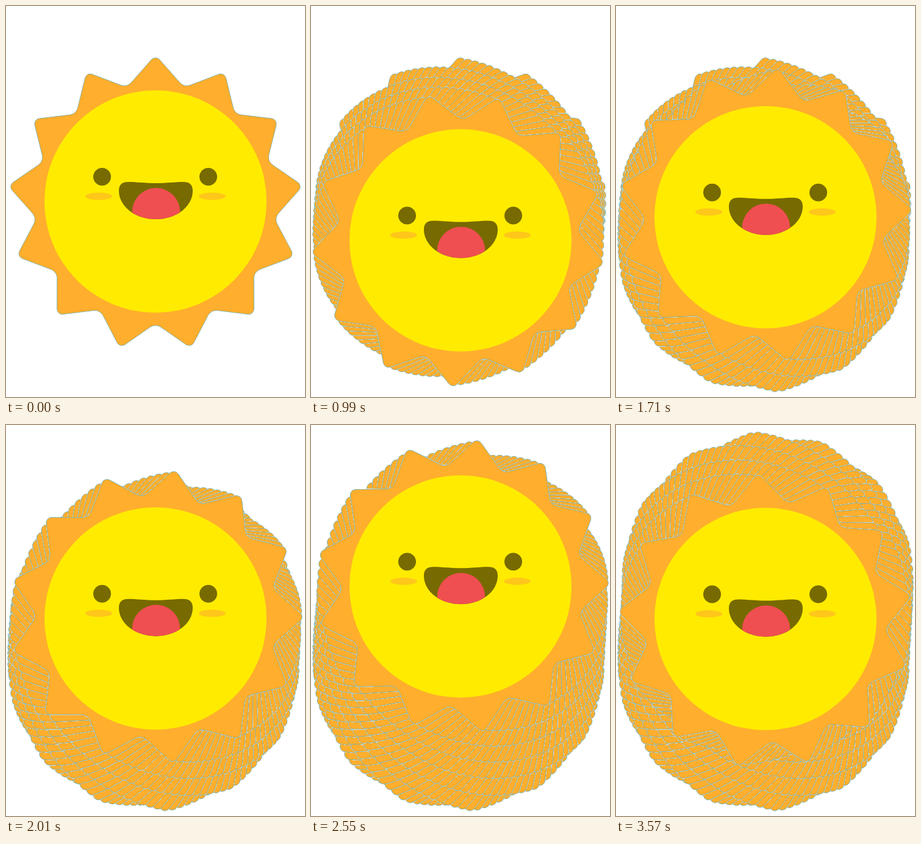
These frames come from a looping animation (490x640 px, 3.6 s). An HTML page with a canvas:

```html
<!DOCTYPE html>
<html lang="en">
<head>
<meta charset="utf-8">
<title>Rolling sun</title>
<style>
  html, body { margin: 0; width: 100%; height: 100%; overflow: hidden; background: #fff; }
  canvas { display: block; }
</style>
</head>
<body>
<canvas id="stage" width="490" height="640"></canvas>
<script>
const W = 490, H = 640, CX = 245, RAYS = 13;
const STEP = 30, STEPS = 120, LOOP = STEP * STEPS;
const ALPHA_CUT = 50;

const ctx = document.getElementById('stage').getContext('2d');
const layer = Object.assign(document.createElement('canvas'), { width: W, height: H });
const layerCtx = layer.getContext('2d', { willReadFrequently: true });

// Height of the sun's centre: straight moves between [ms, y] stops.
const STOPS = [[0, 320], [1188, 396.2], [2715, 248.4], [LOOP, 320]];

function heightAt(ms) {
  const i = STOPS.findIndex(([t], k) => k > 0 && ms <= t);
  const [t0, y0] = STOPS[i - 1], [t1, y1] = STOPS[i];
  return y0 + (y1 - y0) * (ms - t0) / (t1 - t0);
}

// Rounded star; its hub sits slightly below the pivot.
function makeStar() {
  const star = new Path2D(), count = RAYS * 2;
  const corner = k => {
    const r = k % 2 ? 196 : 243.5, a = k * Math.PI / RAYS;
    return [r * Math.sin(a), 3.6 - r * Math.cos(a)];
  };
  const [ax, ay] = corner(0), [bx, by] = corner(1);
  star.moveTo((ax + bx) / 2, (ay + by) / 2);
  for (let k = 1; k <= count; k++) {
    star.arcTo(...corner(k), ...corner(k + 1), k % 2 ? 15 : 9);
  }
  star.closePath();
  return star;
}

function makeMouth() {
  const mouth = new Path2D();
  mouth.ellipse(0.5, -17.5, 60.5, 46.5, 0, 0, Math.PI);
  mouth.bezierCurveTo(-60, -28, -54, -32, -45, -32);
  mouth.bezierCurveTo(-30, -32, -18, -30, 0.5, -30);
  mouth.bezierCurveTo(19, -30, 31, -32, 46, -32);
  mouth.bezierCurveTo(55, -32, 61, -28, 61, -17.5);
  mouth.closePath();
  return mouth;
}

const star = makeStar(), mouth = makeMouth();

function oval(x, y, rx, ry, color) {
  ctx.fillStyle = color;
  ctx.beginPath();
  ctx.ellipse(x, y, rx, ry, 0, 0, Math.PI * 2);
  ctx.fill();
}

// Edge pixels become either clear or solid on white, so poses leave dashed seams.
function hardenEdges() {
  const image = layerCtx.getImageData(0, 0, W, H), px = image.data;
  for (let i = 0; i < px.length; i += 4) {
    const a = px[i + 3];
    if (a === 0 || a === 255) continue;
    for (let c = i; c < i + 3; c++) px[c] = 255 + (px[c] - 255) * a / 255;
    px[i + 3] = a < ALPHA_CUT ? 0 : 255;
  }
  layerCtx.putImageData(image, 0, 0);
}

function drawRays(y, angle) {
  layerCtx.clearRect(0, 0, W, H);
  layerCtx.save();
  layerCtx.translate(CX, y);
  layerCtx.rotate(angle);
  layerCtx.fillStyle = '#ffae2d';
  layerCtx.fill(star);
  layerCtx.strokeStyle = '#2f9fc4';
  layerCtx.lineWidth = 0.6;
  layerCtx.stroke(star);
  layerCtx.restore();
  hardenEdges();
  ctx.drawImage(layer, 0, 0);
}

function drawFace() {
  oval(0, 0, 182, 182, '#ffeb00');
  for (const side of [-1, 1]) {
    oval(side * 87 - 0.5, -40.5, 14.5, 14.5, '#776a00');
    oval(side * 93, -8.5, 22, 6, '#ffc71a');
  }
  ctx.fillStyle = '#776a00';
  ctx.fill(mouth);
  ctx.save();
  ctx.clip(mouth);
  oval(1, 17, 39.3, 39.3, '#ef4f50');
  ctx.restore();
}

function drawSun(step) {
  const y = heightAt(step * STEP);
  drawRays(y, step / STEPS * Math.PI * 2);
  ctx.save();
  ctx.translate(CX, y);
  drawFace();
  ctx.restore();
}

// Poses pile up over one loop, then the stage is wiped.
let drawn = -1, start = null;

function showUpTo(step) {
  if (step < drawn) drawn = -1;
  if (drawn < 0) {
    ctx.fillStyle = '#fff';
    ctx.fillRect(0, 0, W, H);
  }
  while (drawn < step) drawSun(++drawn);
}

function tick(now) {
  if (start === null) start = now;
  showUpTo(Math.floor((now - start) % LOOP / STEP));
  requestAnimationFrame(tick);
}

showUpTo(0);
requestAnimationFrame(tick);
</script>
</body>
</html>
```
